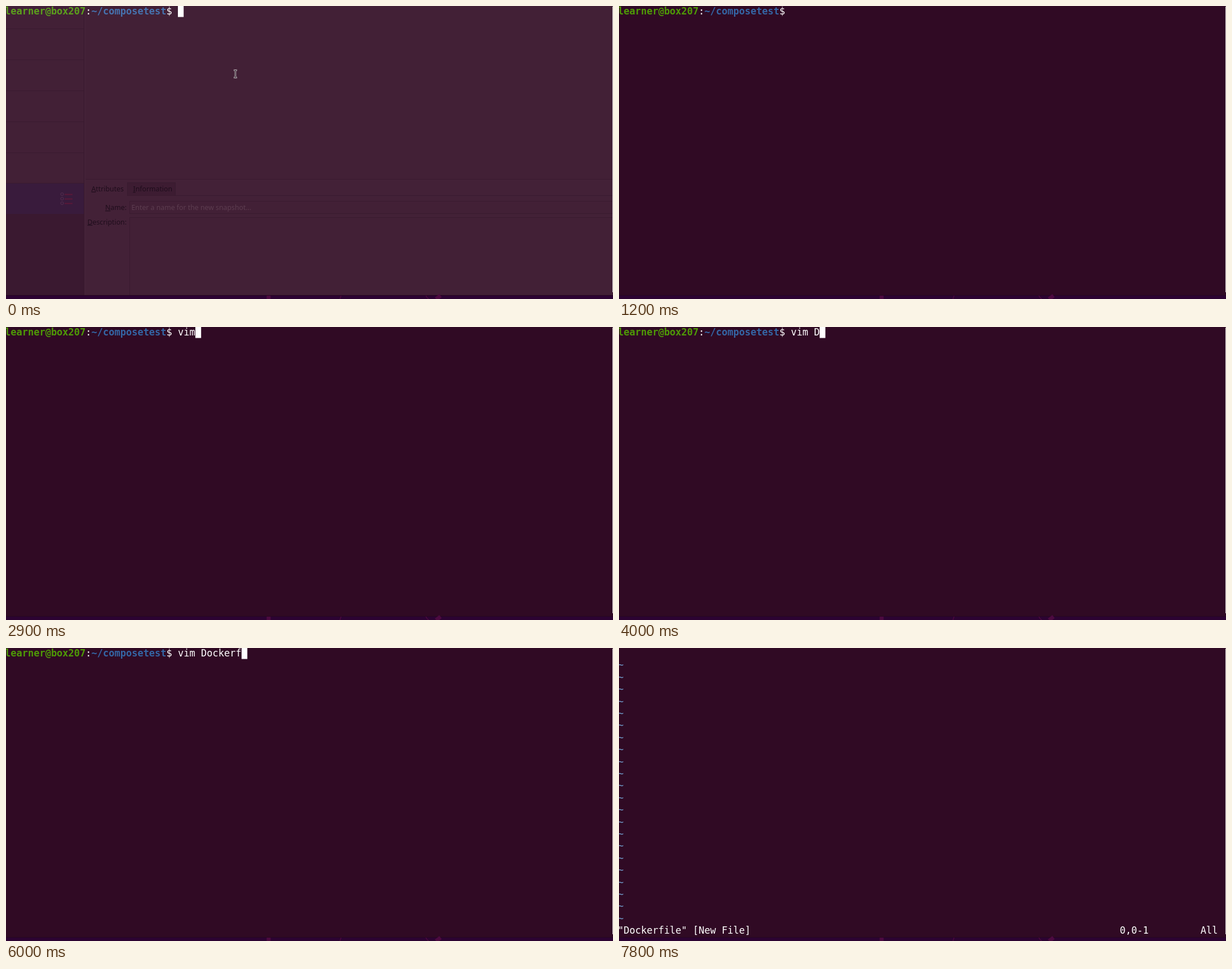
Animation of 1077 by 520 pixels, one loop 8000 ms. Source, as an HTML page:

```html
<!DOCTYPE html>
<html lang="en">
<head>
<meta charset="utf-8">
<title>Terminal session</title>
<style>
  html, body { margin: 0; width: 100%; height: 100%; overflow: hidden; background: #300a24; }
  svg { display: block; width: 1077px; height: 520px; }
  text { white-space: pre; }
  .term { font: 17px "DejaVu Sans Mono", monospace; fill: #fff; }
  .bold { font-weight: bold; }
  .user { fill: #4e9a06; }
  .path { fill: #3465a4; }
  .fading .user { fill: #5ba01c; }
  .fading .path { fill: #4672ae; }
  .form { font: 12.3px "Noto Sans", sans-serif; fill: #1f0d1c; }
  .form .hint { fill: #5d3d50; }
  .form u, .form .key { text-decoration: underline; }
  .rule { fill: none; stroke: #391a2f; }
</style>
</head>
<body>
<svg id="stage" viewBox="0 0 1077 520">
  <rect width="1077" height="520" fill="#300a24"/>

  <g id="ghost">
    <rect width="1077" height="514" fill="#422036"/>
    <rect y="315" width="138" height="54" fill="#391b3c"/>
    <rect y="369" width="138" height="145" fill="#3a1930"/>
    <path class="rule" d="M0 40.5H138M0 95.5H138M0 150.5H138M0 205.5H138M0 260.5H138M0 314.5H138"/>
    <path d="M138.5 0V514" stroke="#37182d"/>
    <path d="M140 0V514" stroke="#48263c"/>
    <rect x="141" y="308" width="936" height="206" fill="#432137"/>
    <path class="rule" d="M141 307.5H1077"/>
    <rect x="215.5" y="313.5" width="85" height="23" fill="#3d1c32" stroke="#381a2e"/>
    <path class="rule" d="M215 336.5H1077"/>
    <rect x="219.5" y="346.5" width="870" height="22" fill="#422036" stroke="#391a2f"/>
    <rect x="219.5" y="375.5" width="870" height="150" fill="#422036" stroke="#391a2f"/>
    <g fill="none" stroke="#5b1838" stroke-width="2">
      <path d="M104 334.5H118M104 342.5H118M104 350.5H118"/>
      <g stroke="#583052" stroke-width="1">
        <circle cx="99.5" cy="334" r="2.5"/>
        <circle cx="99.5" cy="342" r="2.5"/>
        <circle cx="99.5" cy="350" r="2.5"/>
      </g>
    </g>
    <g class="form">
      <text x="151.5" y="328.5"><tspan class="key">A</tspan>ttributes</text>
      <text x="225.5" y="329"><tspan class="key">I</tspan>nformation</text>
      <text x="214" y="362" text-anchor="end"><tspan class="key">N</tspan>ame:</text>
      <text x="222.5" y="362" class="hint">Enter a name for the new snapshot...</text>
      <text x="214" y="387.5" text-anchor="end"><tspan class="key">D</tspan>escription:</text>
    </g>
  </g>

  <rect y="513" width="1077" height="7" fill="#2c0332"/>
  <path d="M0 513.5H1077" stroke="#26071f"/>
  <g fill="none" stroke="#4c0a40">
    <path d="M466 514V520" stroke-width="7"/>
    <path d="M594.5 514L592.5 520" stroke-width="1.5"/>
    <path d="M745 514Q746 517 750 520" stroke-width="1.5"/>
    <path d="M771 514L763 520" stroke-width="7"/>
  </g>
  <path d="M1076.5 1V508" stroke="#e6e1e4"/>

  <g id="shell" class="term"></g>
  <g id="editor" class="term"></g>
  <rect id="caret" width="10.2" height="19.5" fill="#fff"/>

  <g id="pointer" fill="none">
    <path d="M404 114H406L407 115L408 114H410M407 115V126M404 127H406L407 126L408 127H410" stroke="#d8d0d5" stroke-width="2.6"/>
    <path d="M404.5 114H406L407 115L408 114H409.5M407 115V126M404.5 127H406L407 126L408 127H409.5" stroke="#160812" stroke-width="1"/>
  </g>
</svg>

<script>
const LOOP = 8000;
const LEFT = -2, CELL = 10.235, BASE = 15, ROW = 21.4;
const PROMPT = 30;
const FADE_END = 100, POINTER_END = 1200, EDITOR_START = 7300;
const COMMAND = "vim Dockerfile";

// [time, letters typed, caret shown]
const steps = [
  [0, 0, 1], [1200, 0, 0], [1700, 2, 1], [1800, 0, 1], [2400, 0, 0],
  [2800, 2, 1], [2900, 3, 1], [3700, 4, 1], [4000, 5, 1],
  [4400, 6, 1], [4500, 7, 1], [4700, 8, 1], [4800, 9, 1],
  [5200, 10, 1], [5800, 10, 0], [6000, 11, 1], [6300, 12, 1],
  [6600, 13, 1], [6800, 14, 1], [7300, 0, 1], [7800, 0, 0]
];

const $ = id => document.getElementById(id);
const shell = $("shell"), editor = $("editor"), caret = $("caret");
const colX = col => LEFT + col * CELL;
const show = (el, on) => el.setAttribute("visibility", on ? "visible" : "hidden");

function write(parent, col, row, str, cls = "", color) {
  const el = document.createElementNS("http://www.w3.org/2000/svg", "text");
  el.setAttribute("x", colX(col));
  el.setAttribute("y", BASE + row * ROW);
  if (cls) el.setAttribute("class", cls);
  if (color) el.setAttribute("fill", color);
  el.textContent = str;
  parent.append(el);
  return el;
}

write(shell, 0, 0, "learner@box207", "bold user");
write(shell, 14, 0, ":");
write(shell, 15, 0, "~/composetest", "bold path");
write(shell, 28, 0, "$");
const typed = write(shell, PROMPT, 0, "");

for (let row = 1; row <= 22; row++) write(editor, 0, row, "~", "", "#729fcf");
write(editor, 0, 23, '"Dockerfile" [New File]');
write(editor, 87, 23, "0,0-1");
write(editor, 101, 23, "All");

function draw(t) {
  const [, count, caretOn] = steps.findLast(s => s[0] <= t);
  const editing = t >= EDITOR_START;
  show($("ghost"), t < FADE_END);
  show($("pointer"), t < POINTER_END);
  show(shell, !editing);
  show(editor, editing);
  show(caret, caretOn);
  shell.classList.toggle("fading", t < FADE_END);
  typed.textContent = COMMAND.slice(0, count);
  caret.setAttribute("x", Math.round(colX(editing ? 0 : PROMPT + count)));
}

const start = performance.now();
function tick() {
  draw((performance.now() - start) % LOOP);
  requestAnimationFrame(tick);
}
tick();
</script>
</body>
</html>
```
